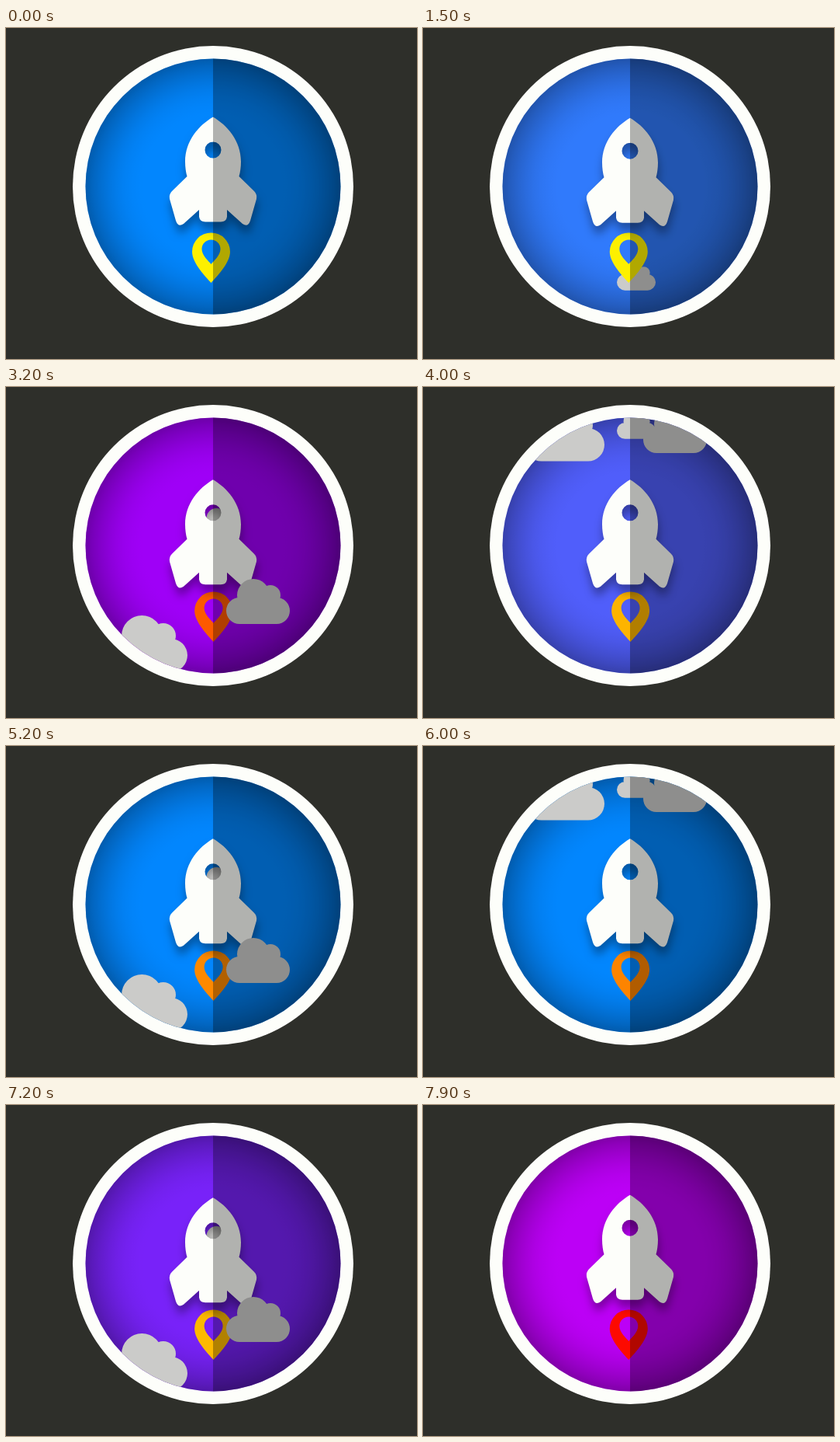
An HTML page with a canvas for the animation above (8000 ms loop, 530 px wide and 426 px high).

```html
<!DOCTYPE html>
<html lang="en">
<head>
<meta charset="utf-8">
<title>Rocket</title>
<style>
html, body { margin: 0; width: 100%; height: 100%; overflow: hidden; background: #2e2f2a; }
canvas { display: block; }
</style>
</head>
<body>
<canvas id="stage" width="530" height="426"></canvas>
<script>
const ctx = document.getElementById('stage').getContext('2d');
const CX = 267, CY = 204, WHITE = '#fdfefa';

const half = new Path2D(`M0 114.5 C-18 125 -36 145 -36 172 C-36 179 -35 186 -33.5 191
  L-53 210 Q-57 214 -56 220 L-48 248 Q-45 257 -38 252 L-18 234
  V243 Q-17 249.5 -10 249.5 H0 Z`);
const rocket = new Path2D();
for (const side of [1, -1]) rocket.addPath(half, new DOMMatrix([side, 0, 0, 1, CX, 0]));
rocket.moveTo(CX + 10.5, 157);
rocket.arc(CX, 157, 10.5, 0, 7);

const flame = new Path2D(`M0 40 C-6 33 -24.5 15 -24.5 0 A24.5 24.5 0 0 1 24.5 0
  C24.5 15 6 33 0 40 Z M0 16 C-3 12 -12 5 -12 -3.5 A12 12 0 0 1 12 -3.5
  C12 5 3 12 0 16 Z`);

// cloud 82 wide, standing on y = 0
const cloud = new Path2D('M17 0 V-34 H65 V0 Z');
for (const [x, y, r] of [[17, -17, 17], [65, -17, 17], [35, -37, 21], [57, -37, 13]]) {
  cloud.moveTo(x + r, y);
  cloud.arc(x, y, r, 0, 7);
}

const vignette = ctx.createRadialGradient(CX, CY, 85, CX, CY, 165);
for (let k = 0; k <= 1; k += .125)
  vignette.addColorStop(k, `rgba(0,0,0,${.32 * k * k})`);

// goes 0 → 1 → 0 while x grows by one
const triangle = x => 1 - Math.abs(1 - 2 * (x - Math.floor(x)));

function disc(radius, fill) {
  ctx.beginPath();
  ctx.arc(CX, CY, radius, 0, 7);
  ctx.fillStyle = fill;
  ctx.fill();
}

// blue, through indigo, to magenta
function skyColor(u) {
  const v = Math.max(0, (u - .29) / .71);
  return `rgb(${2 + 186 * v ** .9},${134 * Math.max(0, 1 - (v / .7) ** 2)},${254 - 8 * v})`;
}

function drawCloud(x, scale, base) {
  ctx.save();
  ctx.translate(x, base);
  ctx.scale(scale, scale);
  ctx.fillStyle = '#cbcbc9';
  ctx.fill(cloud);
  ctx.restore();
}

function draw(step) {
  const secs = step / 10;
  const fall = secs < .5 ? 0 : 1 - (1 - (step + 5) % 10 / 10) ** 1.65;
  // step 0 is the resting pose
  const bob = step && (step % 2 ? 1.2 : 4.8);
  const heat = step && triangle(.195 * (step - 11));

  ctx.fillStyle = '#2e2f2a';
  ctx.fillRect(0, 0, 530, 426);
  disc(181, WHITE);

  ctx.save();
  ctx.beginPath();
  ctx.arc(CX, CY, 164.5, 0, 7);
  ctx.clip();
  disc(166, skyColor(triangle(secs / 5)));
  disc(166, vignette);
  drawCloud(250, .61, -3 + 437 * fall);

  ctx.save();
  ctx.translate(264.5 + .65 * bob, 288);
  ctx.fillStyle = `rgb(253,${240 * (1 - heat)},0)`;
  ctx.fill(flame, 'evenodd');
  ctx.restore();

  ctx.save();
  ctx.translate(0, bob);
  ctx.shadowColor = 'rgba(0,0,0,.34)';
  ctx.shadowBlur = 12;
  ctx.shadowOffsetX = 1;
  ctx.shadowOffsetY = 10;
  ctx.fillStyle = WHITE;
  ctx.fill(rocket, 'evenodd');
  ctx.restore();

  drawCloud(131.5, 1.25, -56 + 950 * fall);
  drawCloud(284, 1, -38 + 771 * fall);

  // shaded right half
  ctx.fillStyle = 'rgba(0,0,0,.3)';
  ctx.fillRect(CX, 0, 263, 426);
  ctx.restore();
}

const start = performance.now();
function tick() {
  const t = (performance.now() - start) % 8000;
  draw(t < 500 ? 0 : Math.floor((t - 400) / 100));
  requestAnimationFrame(tick);
}
tick();
</script>
</body>
</html>
```
